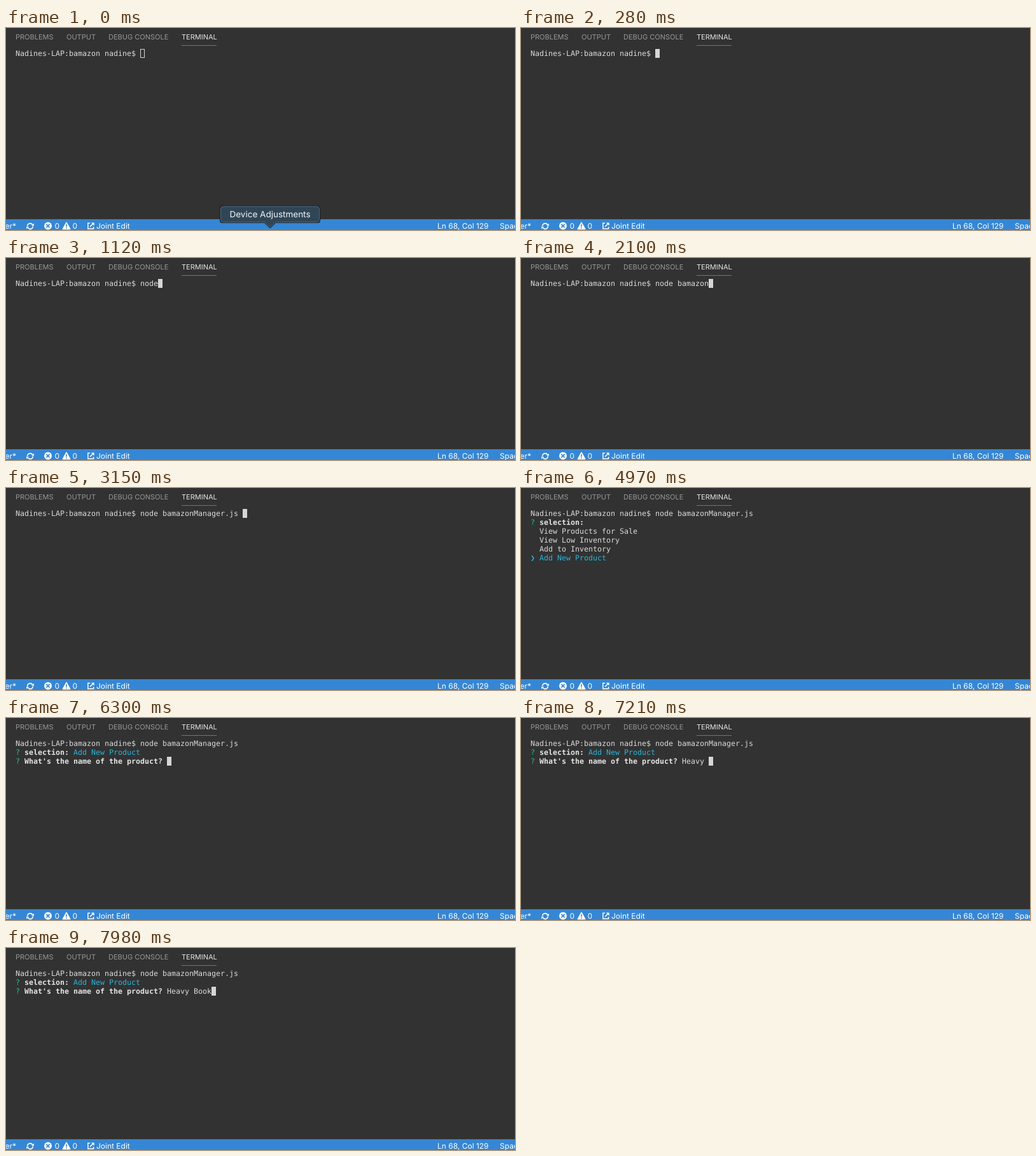
Write an HTML page with a canvas that moves like this. It is 800 px wide and 318 px high and loops after 8000 ms.

```html
<!DOCTYPE html>
<html lang="en">
<head>
<meta charset="utf-8">
<title>Terminal session</title>
<style>
  html, body { margin: 0; width: 100%; height: 100%; overflow: hidden; background: #323232; }
  canvas { display: block; width: 800px; height: 318px; }
</style>
</head>
<body>
<canvas id="stage"></canvas>
<script>
const W = 800, H = 318, LOOP = 8000;
const COL = 7, ROW = 14, LEFT = 15, TOP = 33;
const MONO = '11.63px "DejaVu Sans Mono", monospace';
const UI = 'Inter, sans-serif';
const C = {
  back: '#323232', text: '#dadada', bold: '#e4e4e4', green: '#27bd8a', cyan: '#2bb4d8',
  tab: '#989898', active: '#e6e6e6', bar: '#3586d4', cursor: '#d6d6d6'
};
const PROMPT = 'Nadines-LAP:bamazon nadine$ ';
const COMMAND = 'node bamazonManager.js';
const CHOICES = ['View Products for Sale', 'View Low Inventory', 'Add to Inventory', 'Add New Product'];
const PRODUCT = 'Heavy Book';

// Key press times in ms
const KEYS = [560, 700, 840, 980, 1260, 1400, 1470, 1610, 1680, 1820, 1960, 2030, 2660];
const NAME_KEYS = [6370, 6510, 6860, 6930, 7070, 7210, 7350, 7490, 7630, 7840];
const DOWN_KEYS = [4620, 4760, 4900];
const TIP_OFF = 70, FOCUS = 280, TAB = 3080, ENTER = 3430, MENU = 4410, PICK = 5390;

const canvas = document.getElementById('stage');
const ctx = canvas.getContext('2d');
const dpr = window.devicePixelRatio || 1;
canvas.width = W * dpr;
canvas.height = H * dpr;

const pressed = (keys, t) => keys.filter(k => k <= t).length;

function label(str, x, y, size, color, align = 'left') {
  ctx.font = `${size}px ${UI}`;
  ctx.fillStyle = color;
  ctx.textAlign = align;
  ctx.fillText(str, x, y);
}

function term(str, col, row, color = C.text, bold = false) {
  ctx.font = (bold ? 'bold ' : '') + MONO;
  ctx.fillStyle = color;
  ctx.textAlign = 'left';
  ctx.fillText(str, LEFT + col * COL, TOP + row * ROW + 11);
}

function cursor(col, row, hollow = false) {
  const x = LEFT + col * COL, y = TOP + row * ROW;
  if (hollow) {
    ctx.strokeStyle = C.cursor;
    ctx.lineWidth = 1;
    ctx.strokeRect(x + 0.5, y + 0.5, COL - 1, ROW - 1);
  } else {
    ctx.fillStyle = C.cursor;
    ctx.fillRect(x, y, COL, ROW);
  }
}

function path(points, close = false) {
  ctx.beginPath();
  points.forEach(([x, y]) => ctx.lineTo(x, y));
  if (close) ctx.closePath();
}

function header() {
  label('PROBLEMS', 15, 18, 11, C.tab);
  label('OUTPUT', 95, 18, 11, C.tab);
  label('DEBUG CONSOLE', 161, 18, 11, C.tab);
  label('TERMINAL', 276, 18, 11, C.active);
  ctx.fillStyle = '#747474';
  ctx.fillRect(276, 27, 55, 1);
}

function syncIcon(x, y) {
  ctx.lineWidth = 1.6;
  for (const turn of [0, Math.PI]) {
    ctx.save();
    ctx.translate(x, y);
    ctx.rotate(turn);
    ctx.beginPath();
    ctx.arc(0, 0, 4.4, Math.PI * 1.02, Math.PI * 1.8);
    ctx.stroke();
    path([[5.9, -4.4], [5.9, -0.6], [1.9, -0.8]], true);
    ctx.fill();
    ctx.restore();
  }
}

function errorIcon(x, y) {
  ctx.beginPath();
  ctx.arc(x, y, 6, 0, Math.PI * 2);
  ctx.fill();
  ctx.strokeStyle = C.bar;
  ctx.lineWidth = 1.7;
  for (const s of [-1, 1]) {
    path([[x - 2.6, y - 2.6 * s], [x + 2.6, y + 2.6 * s]]);
    ctx.stroke();
  }
}

function warningIcon(x, y) {
  ctx.strokeStyle = '#fff';
  ctx.lineWidth = 1.4;
  ctx.lineJoin = 'round';
  path([[x, y - 5.3], [x + 5.8, y + 5], [x - 5.8, y + 5]], true);
  ctx.fill();
  ctx.stroke();
  ctx.lineJoin = 'miter';
  ctx.fillStyle = C.bar;
  ctx.fillRect(x - 0.8, y - 2.4, 1.6, 4);
  ctx.fillRect(x - 0.8, y + 2.6, 1.6, 1.6);
}

function linkIcon(x, y) {
  ctx.strokeStyle = ctx.fillStyle = '#fff';
  ctx.lineWidth = 1.5;
  path([[x + 4, y + 0.8], [x + 0.8, y + 0.8], [x + 0.8, y + 9.6],
    [x + 9.6, y + 9.6], [x + 9.6, y + 6.4]]);
  ctx.stroke();
  path([[x + 4, y + 6.4], [x + 8.6, y + 1.8]]);
  ctx.stroke();
  path([[x + 5.8, y], [x + 10.6, y], [x + 10.6, y + 4.8]], true);
  ctx.fill();
}

function statusBar() {
  ctx.fillStyle = C.bar;
  ctx.fillRect(0, 301, W, H - 301);
  const y = 316;
  label('master*', 16, y, 12, '#fff', 'right');
  label('0', 76.5, y, 12, '#fff');
  label('0', 104.5, y, 12, '#fff');
  label('Joint Edit', 142, y, 12, '#fff');
  label('Ln 68, Col 129', 678, y, 12, '#fff');
  label('Spaces: 4', 776, y, 12, '#fff');
  ctx.fillStyle = ctx.strokeStyle = '#fff';
  syncIcon(38, 312);
  errorIcon(66, 311.5);
  ctx.fillStyle = '#fff';
  warningIcon(95, 311.5);
  linkIcon(128, 306.5);
}

function tipShape(l, t, r, b, tip) {
  const m = 415, k = 4;
  ctx.beginPath();
  ctx.moveTo(l + k, t);
  ctx.arcTo(r, t, r, b, k);
  ctx.arcTo(r, b, m, b, k);
  ctx.lineTo(m + 9, b);
  ctx.lineTo(m, tip);
  ctx.lineTo(m - 9, b);
  ctx.arcTo(l, b, l, t, k);
  ctx.arcTo(l, t, r, t, k);
  ctx.closePath();
}

function tooltip() {
  tipShape(336, 279.5, 494, 307, 315.5);
  ctx.fillStyle = '#17232d';
  ctx.fill();
  tipShape(337.5, 281, 492.5, 305.5, 313.5);
  ctx.fillStyle = '#304657';
  ctx.fill();
  ctx.strokeStyle = '#536b7c';
  ctx.lineWidth = 1;
  ctx.stroke();
  label('Device Adjustments', 415, 298, 13.5, '#f4f6f8', 'center');
}

function commandLine(t) {
  const typed = t < TAB ? COMMAND.slice(0, pressed(KEYS, t)) : COMMAND + ' ';
  term(PROMPT + typed, 0, 0);
  if (t < ENTER) cursor(PROMPT.length + typed.length, 0, t < FOCUS);
}

function question(str, row) {
  term('?', 0, row, C.green);
  term(str, 2, row, C.bold, true);
}

function menu(t) {
  const chosen = pressed(DOWN_KEYS, t);
  CHOICES.forEach((choice, i) => {
    const on = i === chosen;
    if (on) term('❯', 0, i + 2, C.cyan);
    term(choice, 2, i + 2, on ? C.cyan : C.text);
  });
}

function productName(t) {
  const ask = "What's the name of the product?";
  const answer = PRODUCT.slice(0, pressed(NAME_KEYS, t));
  const col = ask.length + 3;
  term(CHOICES[3], 13, 1, C.cyan);
  question(ask, 2);
  term(answer, col, 2);
  cursor(col + answer.length, 2);
}

function draw(t) {
  ctx.setTransform(dpr, 0, 0, dpr, 0, 0);
  ctx.textRendering = 'geometricPrecision';
  ctx.fillStyle = C.back;
  ctx.fillRect(0, 0, W, H);
  header();
  commandLine(t);
  if (t >= MENU) {
    question('selection:', 1);
    if (t < PICK) menu(t);
    else productName(t);
  } else if (t >= ENTER) {
    cursor(0, 1);
  }
  statusBar();
  if (t < TIP_OFF) tooltip();
}

const start = performance.now();
function frame() {
  draw((performance.now() - start) % LOOP);
  requestAnimationFrame(frame);
}
frame();
</script>
</body>
</html>
```
